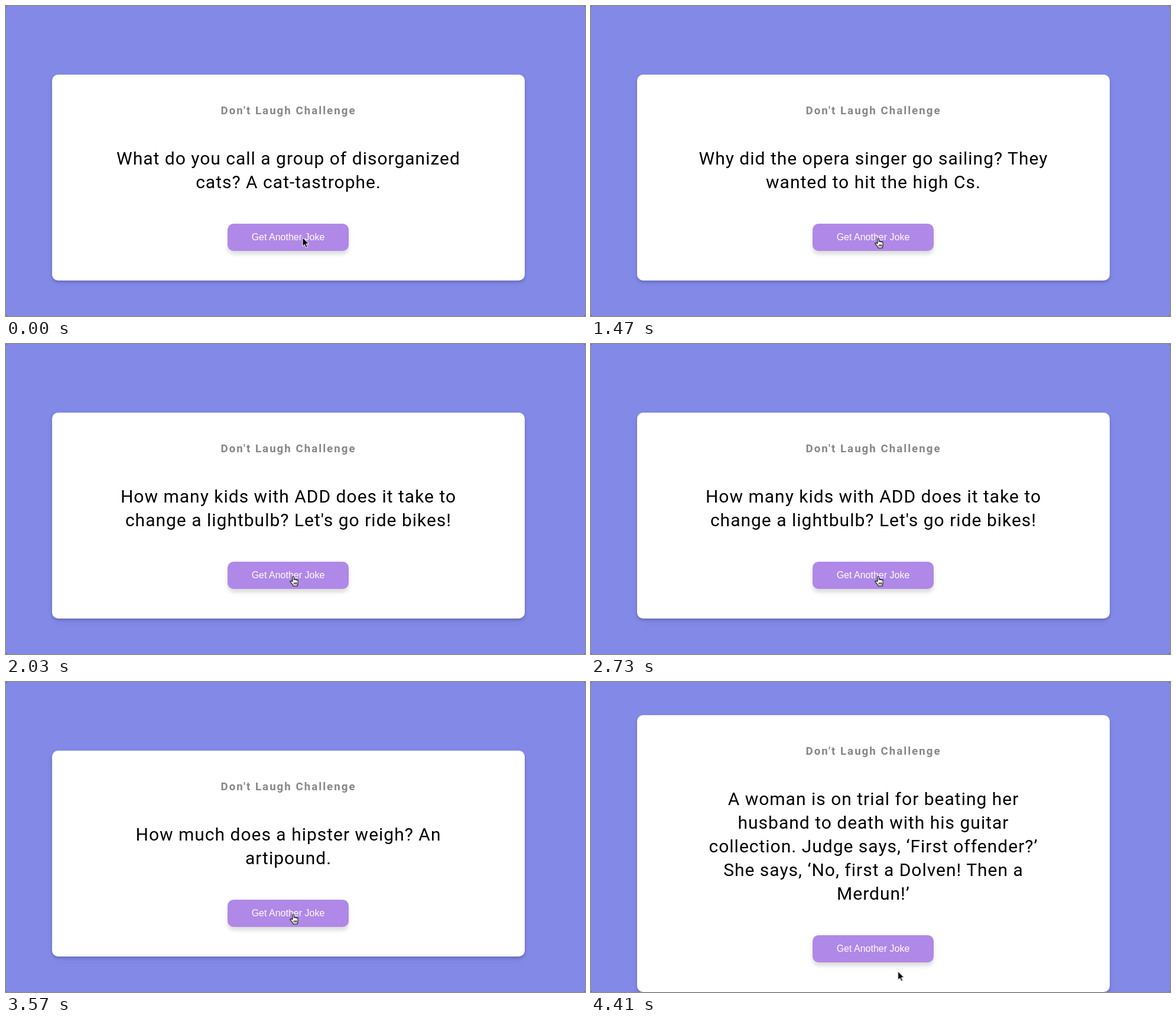
An HTML page for the animation above (4.48 s loop, 980 by 524 pixels).

```html
<!DOCTYPE html>
<html lang="en">
<head>
<meta charset="utf-8">
<title>Don't Laugh Challenge</title>
<style>
  :root { --loop: 4480ms; }
  * { box-sizing: border-box; }
  html, body {
    margin: 0;
    width: 100%;
    height: 100%;
    overflow: hidden;
    background: #4a4e86;
  }
  .stage {
    position: relative;
    width: 980px;
    height: 524px;
    overflow: hidden;
    border-radius: 3px;
    background: #8289e7;
    font-family: Roboto, sans-serif;
    text-align: center;
  }
  .anim { animation: var(--loop) step-end infinite; }

  .card {
    position: absolute;
    left: 78px;
    top: 116px;
    width: 800px;
    height: 348px;
    padding: 50px 20px;
    border-radius: 10px;
    background: #fff;
    box-shadow: 0 3px 4px rgba(0, 0, 0, .16), 0 4px 12px rgba(0, 0, 0, .05);
    animation-name: card;
  }
  h3 {
    margin: 0;
    height: 22px;
    font-size: 18.72px;
    line-height: 22px;
    letter-spacing: 2px;
    color: #868686;
  }
  .jokes {
    position: relative;
    height: 80px;
    margin: 50px 0;
    font-size: 30px;
    line-height: 40px;
    letter-spacing: 1px;
    white-space: nowrap;
    color: #000;
    animation-name: jokes;
  }
  .joke { position: absolute; inset: 0; margin: 0; visibility: hidden; }
  .joke:nth-child(1) { animation-name: joke1; }
  .joke:nth-child(2) { animation-name: joke2; }
  .joke:nth-child(3) { animation-name: joke3; }
  .joke:nth-child(4) { animation-name: joke4; }
  .joke:nth-child(5) { animation-name: joke5; }

  .btn {
    width: 205px;
    height: 46px;
    margin: 0 auto;
    border-radius: 10px;
    background: #b088e7;
    box-shadow: 0 6px 6px rgba(0, 0, 0, .1), 0 5px 12px rgba(0, 0, 0, .05);
    font: 16px/45px "Liberation Sans", Arial, sans-serif;
    color: #fff;
    position: relative;
    left: -.5px;
    animation-name: press;
  }

  svg { position: absolute; left: 0; top: 0; overflow: visible; }
  .ring { fill: none; stroke: #000; stroke-width: 1.4; opacity: 0; animation-name: ring; }
  .pointer { animation-name: move; }
  .arrow { fill: #000; stroke: #fff; stroke-width: 1; animation-name: arrow; }
  .hand { fill: #fff; stroke: #000; stroke-width: 1.1; stroke-linejoin: round; animation-name: hand; }

  @keyframes card {
    0% { top: 116px; height: 348px; }
    81.25%, 100% { top: 56px; height: 468px; }
  }
  @keyframes jokes {
    0% { height: 80px; }
    81.25%, 100% { height: 200px; }
  }
  @keyframes joke1 {
    0% { visibility: visible; }
    18.75%, 100% { visibility: hidden; }
  }
  @keyframes joke2 {
    0%, 42.1875%, 100% { visibility: hidden; }
    18.75% { visibility: visible; }
  }
  @keyframes joke3 {
    0%, 70.3125%, 100% { visibility: hidden; }
    42.1875% { visibility: visible; }
  }
  @keyframes joke4 {
    0%, 81.25%, 100% { visibility: hidden; }
    70.3125% { visibility: visible; }
  }
  @keyframes joke5 {
    0% { visibility: hidden; }
    81.25%, 100% { visibility: visible; }
  }

  /* four clicks */
  @keyframes press {
    0%, 14.0625%, 37.5%, 64.0625%, 76.5625%, 100% { transform: none; }
    10.9375%, 34.375%, 62.5%, 73.4375% { transform: scale(.96); }
  }
  @keyframes ring {
    0%, 15.625%, 39.0625%, 65.625%, 78.125%, 100% { opacity: 0; }
    10.9375%, 34.375%, 62.5%, 73.4375% { opacity: 1; }
    14.0625%, 37.5%, 64.0625%, 76.5625% { opacity: .5; }
  }
  @keyframes move {
    0% { transform: translate(502px, 391.5px); }
    1.5625% { transform: translate(493px, 393px); }
    3.125% { transform: translate(486.5px, 393px); }
    90.625% {
      transform: translate(486.5px, 393px);
      animation-timing-function: steps(6, jump-start);
    }
    100% { transform: translate(519.5px, 489px); }
  }
  @keyframes arrow {
    0%, 82.8125%, 100% { visibility: visible; }
    1.5625% { visibility: hidden; }
  }
  @keyframes hand {
    0%, 82.8125%, 100% { visibility: hidden; }
    1.5625% { visibility: visible; }
  }
</style>
</head>
<body>
<div class="stage">
  <div class="card anim">
    <h3>Don't Laugh Challenge</h3>
    <div class="jokes anim">
      <p class="joke anim">What do you call a group of disorganized<br>cats? A cat-tastrophe.</p>
      <p class="joke anim">Why did the opera singer go sailing? They<br>wanted to hit the high Cs.</p>
      <p class="joke anim">How many kids with ADD does it take to<br>change a lightbulb? Let's go ride bikes!</p>
      <p class="joke anim">How much does a hipster weigh? An<br>artipound.</p>
      <p class="joke anim">A woman is on trial for beating her<br>husband to death with his guitar<br>collection. Judge says, ‘First offender?’<br>She says, ‘No, first a Dolven! Then a<br>Merdun!’</p>
    </div>
    <div class="btn anim">Get Another Joke</div>
  </div>
  <svg width="980" height="524">
    <circle class="ring anim" cx="486" cy="393.5" r="30.5"/>
    <g class="pointer anim">
      <path class="arrow anim" d="M0 0V14.8L3.4 11.6L5.8 17L8.2 16L5.9 10.6H10.4Z"/>
      <g class="hand anim">
        <path transform="translate(-6 -1)" d="M4.5 9.5V2.2c0-2 2.6-2 2.6 0V6.6c.2-1.3 2.4-1.2 2.4.2c.3-1.1 2.3-.9 2.3.4c.4-.9 2-.7 2 .6V12c0 2-1.2 2.6-1.2 5H5.6C5.4 14.8 2.4 12.6 1.2 10.4C.2 8.6 2 7.9 3 8.8ZM7.2 11v3.4M9.3 11v3.4M11.3 11v3.4"/>
      </g>
    </g>
  </svg>
</div>
</body>
</html>
```
